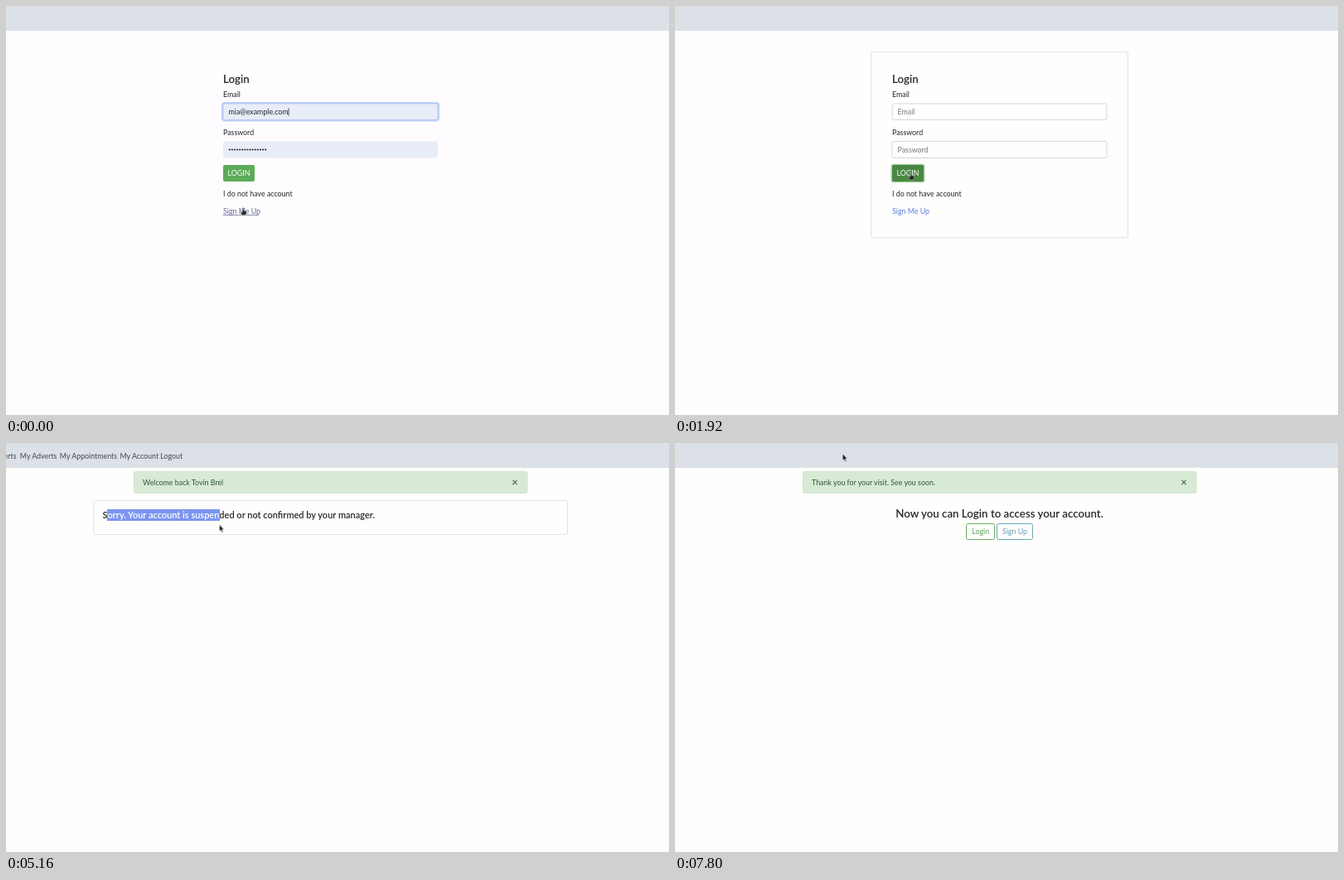
An HTML page that plays this animation: 800x494 px, repeating every 8 s.

```html
<!DOCTYPE html>
<html lang="en">
<head>
<meta charset="utf-8">
<title>Login demo</title>
<style>
  html, body { margin: 0; width: 100%; height: 100%; overflow: hidden; background: #fefefc; }
  #stage { position: relative; width: 800px; height: 494px; overflow: hidden; }
  #stage > svg { position: absolute; left: 0; top: 0; display: block; }
  text { font: 8.85px Lato, "Open Sans", sans-serif; fill: #24282c; white-space: pre; }
  .title { font-size: 13.3px; font-weight: 600; }
  .lead { font-size: 11px; font-weight: 600; }
  .mid { text-anchor: middle; }
  .nav text { fill: #43474d; }
  .alert rect { fill: #d8ead6; stroke: #cfe5cc; }
  .alert text { fill: #2f5637; }
  .alert .close { font-size: 13px; font-weight: 700; fill: #5d6a5d; text-anchor: middle; }
  .field { fill: #fefefd; stroke: #d3d7dc; }
  .hint text { fill: #72787e; }
  .outline { fill: none; stroke: #dfe0e1; }
  #selection { position: absolute; left: 122px; top: 80px; width: 0; height: 14px; overflow: hidden; background: #7c95f0; }
  #selection svg { display: block; }
  #selection text { fill: #fff; }
</style>
</head>
<body>
<div id="stage">
  <svg width="800" height="494" viewBox="0 0 800 494">
    <rect id="paper" width="800" height="494" fill="#fefefc"/>
    <rect width="800" height="30" fill="#dce0e7"/>

    <g id="login">
      <rect id="card" class="outline" x="236.5" y="55.5" width="310" height="224.5" rx="1.5"/>
      <text class="title" x="262" y="93.3">Login</text>
      <text x="262" y="110.2">Email</text>
      <text x="262" y="156">Password</text>

      <g id="filled">
        <rect x="261" y="117" width="261" height="21.5" rx="3" fill="#e8edf8" stroke="#bfd0f6" stroke-width="2"/>
        <rect x="262" y="118" width="259" height="19.5" rx="2" fill="none" stroke="#a9bff0" stroke-width=".7"/>
        <text x="268.5" y="131">mia@example.com</text>
        <path d="M341 123.500v9" stroke="#222" stroke-width=".8"/>
        <rect x="262" y="163.500" width="259" height="20" rx="2" fill="#e9edf7"/>
        <rect id="passwordEdge" x="262" y="163.500" width="259" height="20" rx="2" fill="none" stroke="#d0d7e3"/>
        <path d="M269.800 173.500h44" stroke="#24282c" stroke-width="2.200" stroke-linecap="round" stroke-dasharray="0 3.100"/>
      </g>
      <g id="empty" class="hint">
        <rect class="field" x="262" y="118" width="259" height="19.5" rx="2"/>
        <rect class="field" x="262" y="163.500" width="259" height="20" rx="2"/>
        <text x="268.5" y="131">Email</text>
        <text x="268.5" y="176.500">Password</text>
      </g>

      <rect id="ring" x="260.500" y="190.800" width="41" height="22.400" rx="3" fill="#a9d2a5"/>
      <rect id="button" x="262" y="192" width="38" height="20" rx="2" fill="#5cab59"/>
      <text class="mid" x="281" y="205.200" style="fill:#fff">LOGIN</text>
      <text x="262" y="230">I do not have account</text>
      <text id="link" x="262" y="251.200">Sign Me Up</text>
      <path id="underline" d="M262 252.500h43" stroke="#6a6f9a" stroke-width=".8"/>
    </g>

    <g id="account">
      <g class="nav">
        <text x="12.500" y="18.700" text-anchor="end">My Adverts</text>
        <text x="16.800" y="18.700">My Adverts</text>
        <text x="64.800" y="18.700">My Appointments</text>
        <text x="137.500" y="18.700">My Account</text>
        <text x="186.300" y="18.700">Logout</text>
      </g>
      <g class="alert">
        <rect x="154.500" y="34.500" width="474.500" height="26" rx="2"/>
        <text x="165" y="51">Welcome back Tovin Brel</text>
        <text class="close" x="614" y="52.300">×</text>
      </g>
      <rect class="outline" x="106" y="69.500" width="571.500" height="41" rx="2"/>
      <text class="lead" x="116.500" y="90.600">Sorry. Your account is suspended or not confirmed by your manager.</text>
    </g>

    <g id="goodbye">
      <g class="alert">
        <rect x="154.500" y="34.500" width="474.500" height="26" rx="2"/>
        <text x="165" y="51">Thank you for your visit. See you soon.</text>
        <text class="close" x="614" y="52.300">×</text>
      </g>
      <text class="title mid" x="391.500" y="89.700">Now you can Login to access your account.</text>
      <rect x="351.500" y="97.500" width="34" height="19" rx="2" fill="none" stroke="#68ad64"/>
      <text class="mid" x="368.700" y="110.300" style="fill:#5ca359">Login</text>
      <rect x="388.500" y="97.500" width="43" height="19" rx="2" fill="none" stroke="#69a6ba"/>
      <text class="mid" x="410" y="110.300" style="fill:#5f9fb6">Sign Up</text>
    </g>
  </svg>

  <div id="selection">
    <svg width="300" height="14" viewBox="122 80 300 14">
      <text class="lead" x="116.500" y="90.600">Sorry. Your account is suspended or not confirmed by your manager.</text>
    </svg>
  </div>

  <svg width="800" height="494" viewBox="0 0 800 494">
    <g id="cursor">
      <path id="hand" d="M-.8 .5Q0-.5 .8 .5V3.500L3.800 4.300Q4.500 4.700 4.200 6L3.300 9H-1.300L-3.200 6Q-3.300 4.800-2 5.300L-.8 6Z" fill="#222" stroke="#ddd" stroke-width=".5"/>
      <path id="arrow" d="M0 0V8.200L1.800 6.600L3.100 9.500L4.400 8.900L3.200 6.100H5.400Z" fill="#151515" stroke="#fff" stroke-width=".5"/>
      <path id="beam" d="M-2-4H-.5L0-3.500L.5-4H2M0-3.500V3.500M-2 4H-.5L0 3.500L.5 4H2" fill="none" stroke="#222" stroke-width=".9"/>
    </g>
  </svg>
</div>

<script>
const LOOP = 8000, TICK = 120;
const startTime = document.timeline.currentTime || 0;

// Rows are [time, value, easing until the next row]; the default holds the value.
function play(id, property, rows) {
  const frames = rows.map(([time, value, easing = 'step-end']) =>
    ({ offset: time / LOOP, [property]: value, easing }));
  frames.push({ offset: 1, [property]: rows[rows.length - 1][1] });
  const animation = document.getElementById(id)
    .animate(frames, { duration: LOOP, iterations: Infinity });
  animation.startTime = startTime;
}

// Visible during each [from, to) span.
function show(id, ...spans) {
  const rows = [[0, 0]];
  for (const [from, to] of spans) {
    if (from === 0) rows[0][1] = 1;
    else rows.push([from, 1]);
    if (to < LOOP) rows.push([to, 0]);
  }
  play(id, 'opacity', rows);
}

const at = (x, y) => `translate(${x}px, ${y}px)`;
const ticks = ms => `steps(${ms / TICK}, jump-both)`;
const follow = ms => `steps(${ms / TICK}, jump-start)`;

const CLEAR = 1680, WELCOME = 2040, BYE = 7440;

show('login', [0, WELCOME]);
show('account', [WELCOME, BYE]);
show('goodbye', [BYE, LOOP]);
show('filled', [0, CLEAR]);
show('empty', [CLEAR, WELCOME]);
show('card', [720, LOOP]);
show('passwordEdge', [720, LOOP]);
show('underline', [0, 840]);
show('ring', [1560, WELCOME]);

play('paper', 'fill', [[0, '#fefcfe'], [720, '#fefefc']]);
play('button', 'fill', [[0, '#5cab59'], [960, '#4b9346'], [1560, '#488842']]);
play('link', 'fill', [[0, '#626790'], [840, '#5d7ae0']]);

show('hand', [0, WELCOME], [7200, BYE]);
show('arrow', [WELCOME, 3840], [5160, 7200], [BYE, LOOP]);
show('beam', [3840, 5160]);

play('cursor', 'transform', [
  [0, at(286, 243.5)],
  [720, at(286, 243.5), ticks(360)],
  [1080, at(283.5, 198.5)],
  [1440, at(284.5, 201)],
  [WELCOME, at(282.7, 201)],
  [3240, at(282.7, 201), ticks(600)],
  [3840, at(152, 94)],
  [4080, at(144, 91), follow(360)],
  [4440, at(122, 90)],
  [4920, at(122, 90), ticks(240)],
  [5160, at(205, 97), follow(240)],
  [5400, at(310, 100), follow(240)],
  [5640, at(402, 95)],
  [5760, at(402.7, 93)],
  [6600, at(402.7, 93), ticks(600)],
  [7200, at(204, 14)],
  [7320, at(202.3, 13)]
]);

play('selection', 'width', [
  [0, '0px'],
  [4920, '0px', ticks(240)],
  [5160, '83px', follow(240)],
  [5400, '188px', follow(240)],
  [5640, '280px'],
  [6360, '0px']
]);
</script>
</body>
</html>
```
